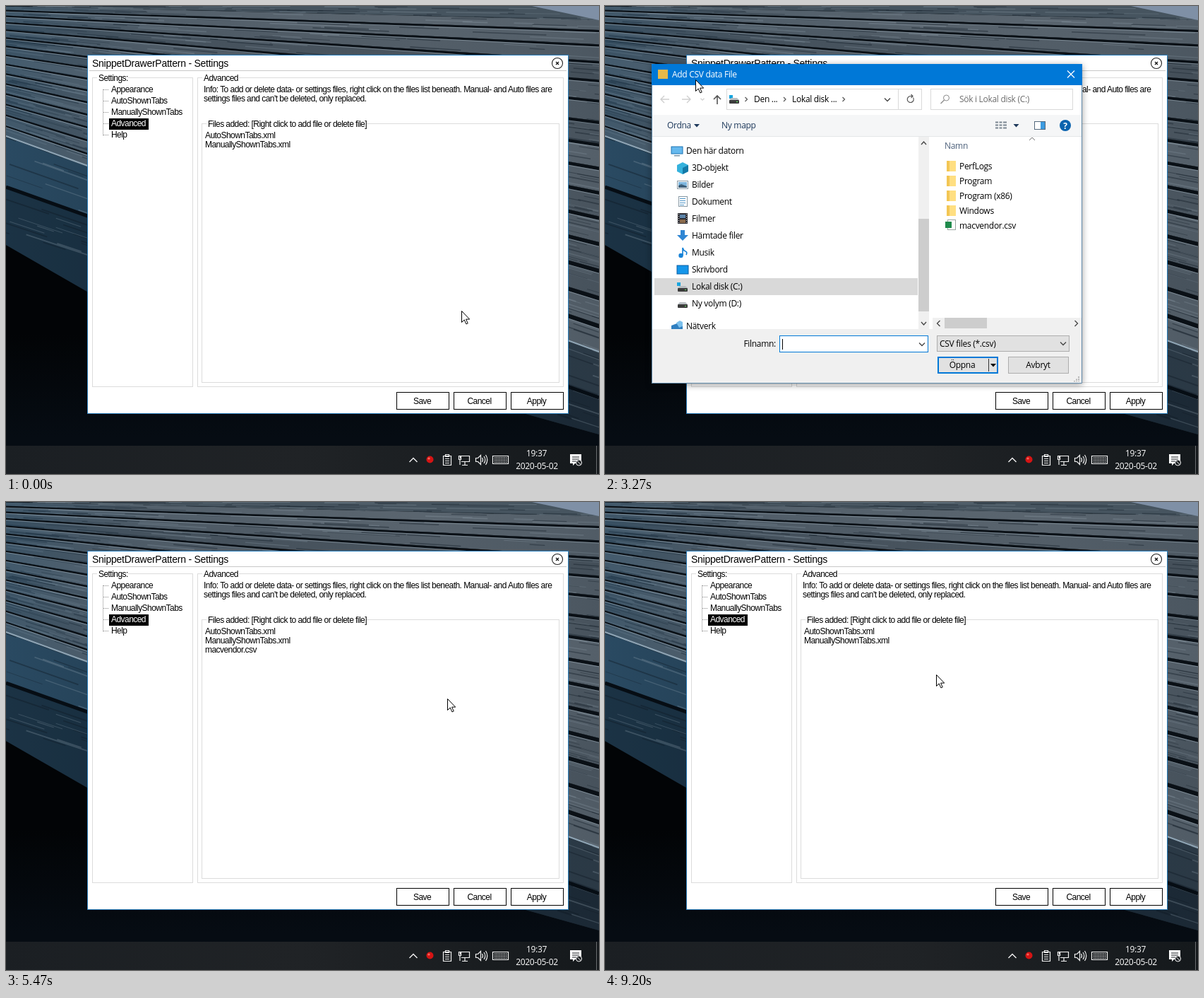
Write an HTML page that moves like this. It is 840 by 662 pixels and loops after 9670 ms.

```html
<!DOCTYPE html>
<html lang="en">
<head>
<meta charset="utf-8">
<title>Settings window</title>
<style>
html, body { margin: 0; width: 100%; height: 100%; overflow: hidden; background: #03070b; }
svg { display: block; width: 840px; height: 662px; }
text { white-space: pre; }
.form { font: 12px "Liberation Sans", Arial, sans-serif; letter-spacing: -.55px; }
.caption { font-size: 14px; letter-spacing: -.25px; }
.ui { font: 12px "Open Sans", "Noto Sans", sans-serif; letter-spacing: -.3px; }
#dialog { transform-origin: 371px 308px; filter: drop-shadow(0 2px 5px #0006); }
</style>
</head>
<body>
<svg id="stage" viewBox="0 0 840 662"></svg>
<script>
const LOOP = 9670, STEP = 1000 / 15;
const $ = id => document.getElementById(id);

// Markup helpers
const rect = (x, y, w, h, fill, more = '') => `<rect x="${x}" y="${y}" width="${w}" height="${h}" fill="${fill}" ${more}/>`;
const box = (x, y, w, h, stroke, fill = 'none', more = '') => rect(x + .5, y + .5, w - 1, h - 1, fill, `stroke="${stroke}" ${more}`);
const path = (d, stroke, width = 1, fill = 'none', more = '') => `<path d="${d}" stroke="${stroke}" stroke-width="${width}" fill="${fill}" ${more}/>`;
const shape = (d, fill, more = '') => path(d, 'none', 0, fill, more);
const disc = (x, y, r, fill, more = '') => `<circle cx="${x}" cy="${y}" r="${r}" fill="${fill}" ${more}/>`;
const text = (x, y, s, fill = '#000', more = '') => `<text x="${x}" y="${y}" fill="${fill}" ${more}>${s}</text>`;
const group = (attrs, ...parts) => `<g ${attrs}>${parts.join('')}</g>`;
const mid = 'text-anchor="middle"';
const chevron = (x, y, w, h, color = '#444', width = 1.3) => path(`M${x - w} ${y - h}L${x} ${y + h}L${x + w} ${y - h}`, color, width);
const arrowRight = (x, y, color = '#555', s = 3) => path(`M${x - s / 2} ${y - s}l${s} ${s}l${-s} ${s}`, color, 1.2);
const dropMark = (x, y, color = '#1e395b') => shape(`M${x - 4} ${y - 2}h8l-4 4.5z`, color);

let seed = 11;
const rnd = () => (seed = seed * 16807 % 2147483647) / 2147483647;

// Wooden deck: boards fan out to the right, u runs from the far to the near edge
const deckY = (u, x) => 185 * u + (20 + 285 * u) * x / 840;
const beamY = (v, x) => 185 + 155 * v + (.363 - .04 * v) * x;

function grain(count, yAt, width) {
  let s = '';
  for (let i = 0; i < count; i++) {
    const u = rnd(), x = rnd() * 900 - 60, w = 20 + rnd() * 90, dark = rnd() < .55;
    s += path(`M${x} ${yAt(u, x)}L${x + w} ${yAt(u, x + w)}`, dark ? '#101a23' : '#9fb0bd', width * (.5 + rnd()), 'none', `opacity="${dark ? .4 : .25}"`);
  }
  return s;
}

function wallpaper() {
  const boards = 15, at = n => (n / boards) ** 1.3;
  let s = rect(0, 0, 840, 662, 'url(#water)')
    + shape('M0 185L840 490V606L115 404L0 338z', 'url(#beam)')
    + shape('M0 258L840 556V606L115 404L0 338z', '#0a1722', 'opacity=".45"')
    + grain(160, (u, x) => beamY(u * .9, x), 1.4)
    + path('M0 256L840 554', '#060d14', 5);
  for (let n = 0; n < boards; n++) {
    const a = at(n), b = at(n + 1), k = 72 + rnd() * 22;
    s += shape(`M0 ${deckY(a, 0)}L840 ${deckY(a, 840)}V${deckY(b, 840)}L0 ${deckY(b, 0)}z`, `rgb(${k},${k + 11},${k + 21})`);
  }
  s += grain(650, deckY, 1.3) + shape('M0 0H840V490L0 185z', 'url(#tint)');
  for (let n = 1; n < boards; n++) {
    const u = at(n), y0 = deckY(u, 0), y1 = deckY(u, 840), t = 3 + 4 * u;
    s += shape(`M0 ${y0}L840 ${y1}v${t}L0 ${y0 + 2.2}z`, '#0a1016');
    s += path(`M0 ${y0 + 2.8}L840 ${y1 + t + .6}`, '#a3b1bc', 1, 'none', 'opacity=".55"');
  }
  return s + path('M0 184L840 489', '#8fa5b5', 2) + shape('M0 0H840V20z', '#46545f') + grain(60, (u, x) => u * 20 * x / 840, 1)
    + shape('M745 0H840V20z', '#7f90a6');
}

function taskbar() {
  const line = (d, w = 1.2, f) => path(d, '#f2f2f2', w, f);
  let keys = '';
  for (let i = 0; i < 24; i++) keys += rect(692 + i % 8 * 2.3, 638.5 + (i >> 3) * 3, 1.2, 1.5, '#f2f2f2');
  return rect(0, 622, 840, 40, 'url(#bar)')
    + line('M571.5 645l5.5-5.5 5.5 5.5', 1.4) + disc(600.5, 641.5, 5, '#d51414') + disc(599, 640, 1.6, '#f36a60')
    + line('M619.5 636.5h11v13h-11zM622.5 636v-1.5h5v3h-5zM622 640.5h6M622 643.5h6M622 646.5h6')
    + line('M643.5 636.5h13v8h-13zM650 645v4M646 649.5h8') + rect(640, 640, 5, 9, '#1b1f22') + line('M641.5 636.5h3v5h-3zM643 642v7')
    + line('M665.5 639.5h3l4-4v13l-4-4h-3zM674.5 639q2 3 0 6M677 637q3.5 5 0 10M679.5 635q4.5 7 0 14')
    + line('M689.5 636.5h22v11h-22z') + keys
    + text(751.5, 637, '19:37', '#fff', mid) + text(752, 655, '2020-05-02', '#fff', mid)
    + shape('M799 634h16v13h-9l-3 3v-3h-4z', '#fff') + path('M802 638h10M802 641h10M802 644h6', '#1b1f22')
    + disc(811.5, 646, 4, '#1b1f22', 'stroke="#fff"') + path('M809 643.5l5 5', '#fff') + path('M836.5 622V662', '#6b6e70');
}

function settings() {
  const frame = '#dcdcdc';
  const legend = (x, y, w, s) => rect(x - 2, y - 9, w, 11, '#fff') + text(x, y, s);
  const button = (x, s) => box(x, 546, 75, 25, '#000', '#fff') + text(x + 36.5, 563, s, '#000', mid);
  const tree = ['Appearance', 'AutoShownTabs', 'ManuallyShownTabs', 'Advanced', 'Help'].map((s, i) =>
    path(`M138 ${118.5 + 16 * i}h8`, '#888', 1, 'none', 'stroke-dasharray="1 1"')
    + (i == 3 ? rect(146, 159, 56, 16, '#000') : '') + text(149, 122 + 16 * i, s, i == 3 ? '#fff' : '#000'));
  return box(115, 69, 682, 508, '#2b7fbd', '#fff')
    + text(122, 86, 'SnippetDrawerPattern - Settings', '#000', 'class="caption"')
    + path('M118 91.5H794', '#c8c8c8')
    + disc(781, 81, 7.5, '#fff', 'stroke="#222" stroke-width="1.1"') + path('M779 79l4 4m0-4l-4 4', '#111', 1.3)
    + box(122, 101, 143, 438, frame) + box(271, 101, 519, 438, frame) + box(277, 166, 507, 367, frame)
    + legend(131, 106, 44, 'Settings:') + legend(280, 106, 52, 'Advanced') + legend(286, 171, 227, 'Files added: [Right click to add file or delete file]')
    + path('M137.5 118V183', '#888', 1, 'none', 'stroke-dasharray="1 1"') + tree.join('')
    + text(280, 122, 'Info: To add or delete data- or settings files, right click on the files list beneath. Manual- and Auto files are')
    + text(280, 135, "settings files and can't be deleted, only replaced.")
    + text(282, 187, 'AutoShownTabs.xml') + text(282, 200, 'ManuallyShownTabs.xml')
    + group('id="added"', rect(280, 202, 501, 13, '#000', 'id="mark"'), text(282, 213, 'macvendor.csv', '#000', 'id="addedName"'))
    + button(553, 'Save') + button(634, 'Cancel') + button(715, 'Apply');
}

const drive = (x, y) => rect(x, y + 2, 14, 5, '#3c3c3c', 'rx="1"') + shape(`M${x} ${y + 2}l3-3h8l3 3z`, '#b9bec2') + rect(x + 10, y + 4, 2, 1, '#6f6');
const monitor = (x, y, c) => rect(x, y - 6, 16, 10, c, 'stroke="#1c74b4"') + rect(x + 4, y + 6, 8, 1.5, '#7b95a8');
const icons = [
  y => monitor(94, y, '#66b9ee'),
  y => shape(`M102 ${y - 4}l8-4 8 4v9l-8 4-8-4z`, '#35b2dd') + shape(`M110 ${y}l8-4v9l-8 4z`, '#137aa8'),
  y => box(102, y - 6, 16, 12, '#8a9aa5', '#fff') + rect(104, y - 4, 12, 8, '#7eb6de') + shape(`M104 ${y + 4}v-3l4-2 8 3v2z`, '#3f607a'),
  y => box(104, y - 8, 13, 15, '#8a9aa5', '#fff') + path(`M106 ${y - 4.5}h8M106 ${y - 1.5}h8M106 ${y + 1.5}h8M106 ${y + 4.5}h6`, '#4b93c6'),
  y => rect(103, y - 8, 14, 15, '#2d2d33') + rect(106, y - 6, 8, 5, '#5b83a8') + rect(106, y + 1, 8, 5, '#8a6a4c') + path(`M104.5 ${y - 7}v13M115.5 ${y - 7}v13`, '#ddd', 1, 'none', 'stroke-dasharray="1 2"'),
  y => shape(`M107 ${y - 8}h6v7h5l-8 8-8-8h5z`, '#2f86d3'),
  y => disc(107.5, y + 4, 3.2, '#1883d7') + path(`M110 ${y + 4}v-11q1 4 4 5t1 5`, '#1883d7', 1.7),
  y => rect(102, y - 6, 16, 12, '#1596ea', 'stroke="#0a5ea3"'),
  y => rect(102, y - 6, 5, 5, '#18a5de') + drive(103, y),
  y => drive(103, y - 1),
  y => shape(`M94 ${y - 1}l8-3 8 2v9l-8 3-8-3z`, '#2f7fc0') + shape(`M101 ${y - 5}l5-3 4 2v6l-5 2z`, '#7cc0ec')
];

function dialog() {
  const names = ['Den här datorn', '3D-objekt', 'Bilder', 'Dokument', 'Filmer', 'Hämtade filer', 'Musik', 'Skrivbord', 'Lokal disk (C:)', 'Ny volym (D:)', 'Nätverk'];
  const rowY = i => 205 + 24 * i + (i == 10 ? 8 : 0);
  const outer = i => i == 0 || i == 10;
  const rows = names.map((s, i) => icons[i](rowY(i)) + text(outer(i) ? 115 : 123, rowY(i) + 4, s));
  const marks = names.map((s, i) => i ? arrowRight(outer(i) ? 81 : 89, rowY(i), '#a0a0a0', 4) : chevron(81, 204.5, 4, 2, '#555'));
  const files = ['PerfLogs', 'Program', 'Program (x86)', 'Windows', 'macvendor.csv'].map((s, i) => {
    const y = 219 + 21 * i;
    const icon = i < 4 ? rect(484, y, 13, 15, '#ffdf82') + rect(484, y, 4, 15, '#f3c654')
      : box(485, y - 1, 12, 15, '#9aa5a0', '#fff') + rect(482, y + 2, 9, 9, '#1f8a4c');
    return icon + text(502, y + 12, s);
  });
  const ink = '#1e395b', pale = '#cfcfcf';
  const back = (x, d) => path(`M${x - 6 * d} 132h${12 * d}m${-5 * d}-5l${5 * d} 5l${-5 * d} 5`, pale, 1.4);
  const button = (x, s, color, w) => rect(x + w / 2, 496 + w / 2, 86 - w, 24 - w, '#e1e1e1', `stroke="${color}" stroke-width="${w}"`) + s;
  return rect(66, 82, 610, 452, '#fff')
    // Lists
    + rect(70, 193, 373, 24, '#e5f3fb', 'id="treeHover"') + rect(70, 385, 373, 24, '#d9d9d9')
    + rows.join('') + group('id="marks"', ...marks)
    + rect(444, 185, 15, 272, '#f0f0f0') + rect(444, 301, 15, 131, '#cdcdcd')
    + chevron(451.5, 194, 3.5, -2) + chevron(451.5, 449, 3.5, 2)
    + text(481, 202, 'Namn', '#4c607a') + chevron(605, 188, 4, -2, '#777', 1)
    + box(478, 300, 197, 21, '#a8d8ee', '#e0f2fb', 'id="fileHover"') + files.join('')
    + rect(464, 441, 211, 16, '#f0f0f0') + rect(481, 441, 60, 15, '#cdcdcd')
    + path('M474.5 445l-4 4 4 4M665.5 445l4 4-4 4', '#444', 1.3)
    // Title and address bar
    + rect(66, 82, 610, 30, '#0078d7') + rect(75, 90, 14, 13, '#e9b949') + text(95, 101, 'Add CSV data File', '#fff')
    + path('M655 91.5l10 10m0-10l-10 10', '#fff', 1.2)
    + back(85, -1) + back(115, 1) + chevron(138, 132, 2.5, 1.2, pale) + path('M159 139v-12m-5 5l5-5 5 5', '#555', 1.6)
    + box(172, 117, 277, 30, '#d9d9d9') + path('M415.5 118V146', '#d9d9d9') + rect(176, 126, 5, 5, '#18a5de') + drive(176, 131)
    + arrowRight(200, 132) + text(211, 136, 'Den ...')
    + group('id="fullAddress"', arrowRight(256, 132), text(268, 136, 'Lokal disk (C:)'))
    + group('id="cutAddress"', arrowRight(254.5, 132), text(265, 136, 'Lokal disk ...'), arrowRight(338, 132))
    + chevron(400, 132.5, 4, 2) + path('M436.5 129.5a4.5 4.5 0 1 1-4-2h3m-2-2.5l2.5 2.5-2.5 2.5', '#555', 1.2)
    + box(461, 117, 202, 30, '#d9d9d9') + disc(483.5, 130, 4, 'none', 'stroke="#8a8a8a"') + path('M480.5 133l-5 5', '#8a8a8a', 1.3)
    + text(502, 136, 'Sök i Lokal disk (C:)', '#6d6d6d')
    // Toolbar
    + rect(66, 154, 609, 30, '#f5f6f7') + path('M66 184.5H675', '#e4e6e8')
    + text(88, 173, 'Ordna', ink) + dropMark(130, 169) + text(165, 173, 'Ny mapp', ink)
    + path('M553 164.5h4m1.5 0h4m1.5 0h5M553 168.5h4m1.5 0h4m1.5 0h5M553 172.5h4m1.5 0h4m1.5 0h5', '#7b8691', 2) + dropMark(582.5, 169)
    + box(608, 163, 16, 12, '#53687c', '#fff') + rect(617, 164, 6, 10, '#3d9be0')
    + disc(652, 169, 8, '#0a63ae') + text(652, 173.5, '?', '#fff', mid + ' font-weight="bold"')
    // Bottom panel
    + rect(66, 457, 610, 77, '#f0f0f0') + text(242, 482, 'Filnamn:', '#000', 'text-anchor="end"')
    + box(247, 466, 211, 24, '#0078d7', '#fff') + chevron(449, 478.5, 4, 2)
    + rect(251, 471, 1, 15, '#000', 'id="caret"') + text(251, 482, 'macvendor.csv', '#000', 'id="fileName"')
    + box(470, 466, 188, 23, '#adadad', '#e1e1e1') + text(474, 482, 'CSV files (*.csv)') + chevron(649, 477.5, 4, 2)
    + button(471, text(506, 512, 'Öppna', '#000', mid), '#0078d7', 2) + path('M543.5 499V517', '#333') + dropMark(550, 508, '#000')
    + button(571, text(613.5, 512, 'Avbryt', '#000', mid), '#adadad', 1)
    + path('M671 524v7M668 527.5v4M665 530v1.5', '#b5b5b5', 2, 'none', 'stroke-dasharray="2 1"')
    + path('M66.5 112V533.5H675.5V112', '#5f88a8');
}

const menu = () => box(0, 0, 113, 70, '#b5b5b5', '#f8f8f8') + rect(2, 2, 24, 66, '#f0f0f0')
  + box(2, 2, 109, 22, '#0078d7', '#b3d7f3', 'id="menuHover"')
  + ['Add file', 'Delete file', 'Replace file'].map((s, i) => text(33, 17 + 22 * i, s)).join('');

const fade = (id, attrs, ...stops) => `<linearGradient id="${id}" ${attrs}>` + stops.map(([o, c, a = 1]) =>
  `<stop offset="${o}" stop-color="${c}" stop-opacity="${a}"/>`).join('') + '</linearGradient>';

$('stage').innerHTML = '<defs>'
  + fade('water', 'x2="0" y2="1"', [0, '#020406'], [.7, '#020406'], [.92, '#060c13'], [1, '#060c13'])
  + fade('beam', '', [0, '#2a4a62'], [.3, '#213c50'], [1, '#2b3945'])
  + fade('tint', '', [0, '#1f4a69', .4], [.25, '#30485c', .15], [.7, '#30404c', 0], [1, '#1a2630', .12])
  + fade('bar', '', [0, '#1b1f23'], [.5, '#202326'], [1, '#15191c']) + '</defs>'
  + wallpaper() + group('class="ui"', taskbar())
  + group('class="form"', settings()) + group('class="ui" id="dialog"', dialog()) + group('class="ui" id="menu"', menu())
  + path('M.5.5v16l3.7-3.6 2.7 6 2.3-1-2.6-5.8h5.1z', '#000', 1, '#fff', 'id="cursor"');

// Pointer stops: time, x, y
const stops = [
  [0, 645, 431], [733, 342, 218], [1000, 342, 218], [1267, 362, 231], [1933, 362, 231], [2133, 338, 197],
  [2800, 150, 122], [2933, 140, 107], [3070, 116, 103], [3267, 128, 104], [3470, 180, 106], [3600, 185, 110],
  [4000, 428, 467], [4200, 535, 472], [4330, 535, 472], [4533, 534, 310], [5200, 534, 310], [5600, 657, 267],
  [5800, 657, 267], [5867, 616, 272], [6000, 616, 272], [6533, 342, 206], [7333, 342, 206], [7733, 366, 244],
  [8000, 366, 244], [8067, 378, 244], [8267, 378, 244], [8667, 501, 211], [8933, 501, 211], [9200, 469, 244], [LOOP, 469, 244]
];

function pointer(t) {
  const i = stops.findIndex(s => s[0] > t), [t0, x0, y0] = stops[i - 1], [t1, x1, y1] = stops[i];
  const p = (t - t0) / (t1 - t0), e = p * p * (3 - 2 * p);
  return [Math.round(x0 + (x1 - x0) * e), Math.round(y0 + (y1 - y0) * e)];
}

const clamp = v => Math.max(0, Math.min(1, v));
const show = (id, on) => $(id).style.display = on ? '' : 'none';

function draw(now) {
  const t = Math.floor((now % LOOP + 4) / STEP) * STEP;
  const [x, y] = pointer(t);
  $('cursor').setAttribute('transform', `translate(${x} ${y})`);

  const opening = clamp((t - 1867) / 266), closing = clamp((t - 4733) / 167);
  show('dialog', t > 1900 && t < 4920);
  $('dialog').style.opacity = opening * (1 - closing);
  $('dialog').style.transform = `scale(${.94 + .06 * opening - .05 * closing})`;
  show('treeHover', y > 192 && y < 217 && x < 443 && t < 2900);
  $('marks').style.opacity = clamp((2940 - t) / 400);
  show('fullAddress', t < 2300);
  show('cutAddress', t >= 2300);
  show('fileHover', t > 4450);
  show('fileName', t > 4580);
  show('caret', t < 4580);

  const first = t > 860 && t < 1530, second = t > 7190 && t < 8060;
  const mx = second ? 354 : 353, my = second ? 214 : 226;
  const item = Math.floor((y - my - 2) / 22);
  show('menu', first || second);
  $('menu').setAttribute('transform', `translate(${mx} ${my})`);
  show('menuHover', x > mx && item >= 0);
  $('menuHover').setAttribute('y', 2.5 + 22 * Math.max(0, item));

  const picked = t > 6720;
  show('added', t > 4920 && t < 8060);
  show('mark', picked);
  $('addedName').setAttribute('fill', picked ? '#fff' : '#000');
}

const start = performance.now();
(function tick() {
  draw(performance.now() - start);
  requestAnimationFrame(tick);
})();
</script>
</body>
</html>
```
